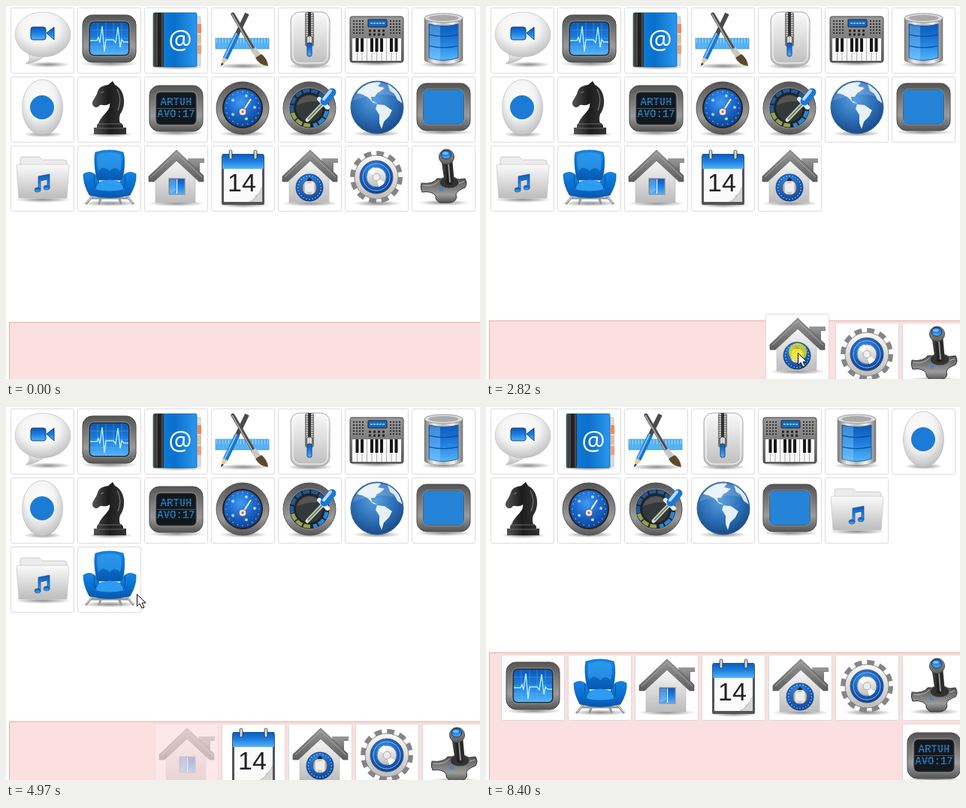
An HTML page for the animation above (9 s loop, 631x497 px).

```html
<!DOCTYPE html>
<html lang="en">
<head>
<meta charset="utf-8">
<title>Drag icons to the tray</title>
<style>
html, body { margin: 0; width: 100%; height: 100%; overflow: hidden; background: #fff; }
svg { display: block; width: 631px; height: 497px; }
</style>
</head>
<body>
<svg id="stage" viewBox="0 0 631 497"></svg>
<script>
const stops = list => list.map((c, i) => `<stop offset="${i / (list.length - 1)}" stop-color="${c}"/>`).join('');
const linear = (id, list, across = 0) =>
  `<linearGradient id="${id}" x1="0" y1="0" x2="${across}" y2="${1 - across}">${stops(list)}</linearGradient>`;
const radial = (id, list) => `<radialGradient id="${id}" cx=".45" cy=".35" r=".7">${stops(list)}</radialGradient>`;

const paint = id => `fill="url(#${id})"`;
const path = (d, attrs) => `<path d="${d}" ${attrs}/>`;
const line = (d, color, width = 1, more = '') =>
  path(d, `fill="none" stroke="${color}" stroke-width="${width}" ${more}`);
const rect = (x, y, w, h, r, attrs) =>
  `<rect x="${x}" y="${y}" width="${w}" height="${h}" rx="${r}" ${attrs}/>`;
const oval = (x, y, rx, ry, attrs) => `<ellipse cx="${x}" cy="${y}" rx="${rx}" ry="${ry}" ${attrs}/>`;
const disc = (x, y, r, attrs) => oval(x, y, r, r, attrs);
const shadow = (x, y, w) => oval(x, y, w, 4, paint('shade'));
const text = (x, y, size, font, attrs, s) =>
  `<text x="${x}" y="${y}" font-size="${size}" font-family="${font}" text-anchor="middle" ${attrs}>${s}</text>`;

const gradients =
  linear('steel', ['#555', '#777', '#9b9b9b', '#555']) +
  linear('silver', ['#fafafa', '#dcdcdc', '#bcbcbc']) +
  linear('chrome', ['#777', '#eee', '#bbb', '#f5f5f5', '#777'], 1) +
  linear('blue', ['#0b59b8', '#1d7fe0', '#55b5fa']) +
  linear('cover', ['#0a84e0', '#0b70cc', '#2a98ee'], 1) +
  linear('seat', ['#1187e6', '#0a6fd0', '#0758b0']) +
  linear('slate', ['#999', '#5e5e5e']) +
  linear('black', ['#555', '#1c1c1c', '#333'], 1) +
  radial('pearl', ['#fff', '#f4f4f4', '#b9b9b9']) +
  radial('sea', ['#5d9fdd', '#2f74bd', '#17457f']) +
  radial('glow', ['#3d9cf5', '#1a66c8', '#0c3a86']) +
  `<radialGradient id="shade"><stop offset="0" stop-color="#000" stop-opacity=".45"/>
   <stop offset="1" stop-color="#000" stop-opacity="0"/></radialGradient>`;

const bezel = (y, h) => shadow(43, y + h + 2, 38) +
  rect(7, y, 71, h, 13, paint('steel') + ' stroke="#4a4a4a"') +
  rect(15, y + 8, 55, h - 16, 7, 'fill="#2b2b2b" stroke="#aaa" stroke-width=".8"');
const house = shadow(43, 77, 38) +
  path('M58 17H80V23H74V42L60 30Z', paint('slate')) +
  path('M15 42L43 16 68 42V76H15Z', paint('silver') + ' stroke="#bbb" stroke-width=".6"') +
  path('M43 6L79 40V48H73L43 20 13 48H6V41Z', paint('slate') + ' stroke="#555" stroke-width=".7"') +
  line('M9 42L43 10 77 42', '#aaa');
const ball = shadow(43, 76, 32) + disc(42, 42, 35, paint('steel') + ' stroke="#555"');

// Evenly spaced points around a centre
const ring = (n, r, x, y, size, color) => Array.from({ length: n }, (_, i) => {
  const a = i / n * 2 * Math.PI;
  return disc(x + r * Math.cos(a), y + r * Math.sin(a), size, `fill="${color}"`);
}).join('');
const repeat = (n, f) => Array.from({ length: n }, (_, i) => f(i)).join('');

const icons = {
  chat: shadow(50, 76, 30) +
    path('M22 58Q30 69 20 75Q36 74 48 62Z', paint('silver') + ' stroke="#aaa" stroke-width=".6"') +
    oval(43, 36, 37, 30, paint('pearl') + ' stroke="#bbb" stroke-width=".6"') +
    rect(27, 26, 20, 17, 3, paint('blue') + ' stroke="#12427f"') +
    path('M48 34L58 26V43Z', paint('blue') + ' stroke="#12427f"'),

  monitor: bezel(10, 63) + rect(17, 20, 51, 43, 5, paint('blue')) +
    line('M17 30H68M17 41H68M17 52H68M27 20V63M38 20V63M48 20V63M59 20V63', '#67bdf7', .6, 'opacity=".6"') +
    line('M17 44H26L28 40 30 47 33 25 36 59 38 43H48L51 47 54 26 57 53 59 43 62 46H68', '#b4efff', 1.4),

  book: shadow(44, 79, 36) + rect(67, 12, 8, 65, 1, 'fill="#ddd" stroke="#aaa" stroke-width=".6"') +
    rect(71, 22, 5, 12, 1, 'fill="#e88b60"') + rect(71, 36, 5, 12, 1, 'fill="#d8c0a8"') +
    rect(71, 50, 5, 12, 1, 'fill="#e5a184"') +
    rect(12, 7, 58, 72, 2, paint('cover') + ' stroke="#08518f" stroke-width=".7"') +
    rect(12, 7, 14, 72, 2, paint('black')) + line('M17 8V78M24 8V78', '#777', .8) +
    text(48, 55, 35, "'Open Sans', sans-serif", 'fill="#fff"', '@'),

  tools: shadow(43, 78, 36) +
    rect(6, 41, 71, 14, 0, 'fill="#58b1f2" stroke="#2b83cc" stroke-width=".6"') +
    line('M7 44.5H77', '#9ed5fb', 6, 'stroke-dasharray="1 3"') +
    line('M48 8L33 39', '#4a4a4a', 6) + line('M35 35L19 68', '#1777d0', 7) +
    line('M34 34L18 67', '#7cc2f8', 2) + path('M15.500 66L22.500 70 13 78Z', 'fill="#e4c6a0"') +
    path('M14 74L17 75 13 78Z', 'fill="#222"') +
    line('M29 9L57 57', '#4d4d4d', 5, 'stroke-linecap="round"') + line('M28 9L55 56', '#bbb', 1.5) +
    line('M56 55L63 65', '#c8c8c8', 8) + path('M59 67L67 62Q75 68 76 78Q64 77 59 67Z', 'fill="#5a4a2c"'),

  zip: shadow(43, 78, 31) + rect(17, 6, 52, 71, 12, paint('silver') + ' stroke="#aaa"') +
    rect(20, 8, 46, 66, 10, 'fill="none" stroke="#fff"') +
    rect(36, 6, 12, 46, 3, 'fill="#777"') + line('M42 7V49', '#ddd', 9, 'stroke-dasharray="1.5 1.5"') +
    rect(40, 6, 4, 44, 0, 'fill="#333"') + rect(38, 38, 8, 11, 3, paint('chrome') + ' stroke="#444"') +
    rect(39, 47, 6, 18, 2, paint('blue') + ' stroke="#18477f"'),

  keys: shadow(43, 74, 38) + rect(7, 12, 71, 61, 3, paint('slate') + ' stroke="#444"') +
    rect(31, 16, 25, 10, 1, 'fill="#1769bd" stroke="#222"') + line('M34 21H53', '#6cc4ff', 2, 'stroke-dasharray="3 1"') +
    line('M11 18H27M11 22H27M11 26H27M11 30H27M11 34H27M60 18H75M60 22H75M60 26H75M60 30H75M60 34H75', '#333', 2, 'stroke-dasharray="2 2"') +
    line('M32 31H55M32 36H55', '#222', 3, 'stroke-dasharray="3 3"') +
    rect(10, 41, 65, 30, 1, 'fill="#f8f8f8"') +
    repeat(9, i => line(`M${16.5 + i * 6.5} 41V71`, '#999', .8)) +
    repeat(9, i => i % 4 == 2 ? '' : rect(14.500 + i * 6.5, 41, 4, 18, .5, 'fill="#181818"')),

  drum: shadow(43, 76, 32) + path('M17 14V70A26 7 0 0 0 68 70V14Z', paint('chrome') + ' stroke="#888" stroke-width=".6"') +
    oval(42.500, 14, 25.500, 6, 'fill="#ddd" stroke="#999"') + oval(42.500, 14, 20, 4, 'fill="#aaa"') +
    path('M23 22Q42 27 62 22V67Q42 74 23 67Z', paint('blue') + ' stroke="#2c5b8c"') +
    path('M24 23Q34 25 38 25V70Q28 70 24 67Z', 'fill="#8ed3ff" opacity=".4"') +
    line('M23 36Q42 41 62 36M23 51Q42 56 62 51', '#0c468b', 1.2),

  egg: shadow(43, 77, 26) + oval(42.500, 41, 27, 37, paint('pearl') + ' stroke="#bbb" stroke-width=".7"') +
    disc(42, 41, 16, 'fill="#1c7bd6"'),

  knight: shadow(44, 77, 30) +
    path('M47 6L50 11C63 17 66 38 57 50C55 56 56 60 58 64H28C30 52 45 46 43 36C38 40 33 37 30 38C27 42 22 42 20 37C19 32 25 28 27 20C29 13 36 12 41 11Z', paint('black')) +
    path('M28 62H58Q62 65 61 68H65V77H22V68H26Q25 65 28 62Z', paint('black')) +
    line('M28 63H58M25 69H62', '#777', .8) + line('M31 22L35 20M53 17Q60 30 54 45', '#777', 1.2),

  board: bezel(12, 61) + rect(17, 22, 51, 41, 5, 'fill="#14191e"') +
    text(42.500, 38, 14, "'Liberation Mono', monospace", 'font-weight="700" fill="#2f9df0"', 'ARTUH') +
    text(42.500, 54, 14, "'Liberation Mono', monospace", 'font-weight="700" fill="#2f9df0"', 'AVO:17') +
    line(repeat(10, i => `M17 ${24 + i * 4}H68`) + repeat(17, i => `M${18 + i * 3} 22V63`), '#14191e', .7) +
    line('M17 42.500H68', '#555'),

  gauge: ball + disc(42, 42, 26, paint('glow') + ' stroke="#222" stroke-width="2"') +
    ring(20, 22, 42, 42, .7, '#b4dcff') +
    ring(5, 16, 42, 41, 2, '#a9d4fb') + line('M42 47L53 30', '#fff', 2) +
    disc(42, 47, 5, 'fill="#e5e5e5" stroke="#555"') + disc(42, 47, 1.5, 'fill="#d44"'),

  dial: ball + disc(42, 42, 27, 'fill="#222" stroke="#aaa" stroke-width=".8"') +
    line('M24 57A23 23 0 0 1 60 27', '#1d5898', 5, 'stroke-dasharray="9 2"') +
    line('M64 35A23 23 0 0 1 47 65', '#2388dd', 5, 'stroke-dasharray="9 2"') +
    line('M43 65A23 23 0 0 1 19 46', '#93a24f', 5, 'stroke-dasharray="9 2"') +
    disc(42, 42, 18, 'fill="#34383a"') + path('M25 38A18 18 0 0 1 57 33Q41 32 25 38Z', 'fill="#555"') +
    line('M39 58L60 36', '#ddd', 5, 'stroke-linecap="round"') + line('M40 57L59 37', '#66884c', 2) +
    line('M55 30L66 41', '#e8eef5', 6, 'stroke-linecap="round"') +
    line('M62 33L72 21', '#1b78d2', 11, 'stroke-linecap="round"') +
    line('M61 30L70 19', '#b6ddff', 4, 'stroke-linecap="round"'),

  globe: shadow(43, 76, 32) + disc(43, 41, 35, paint('sea') + ' stroke="#315f94"') +
    path('M16 22C24 11 36 6 48 8L44 13 53 15 47 20 43 22 40 27 35 27 36 32 44 36 38 35 31 28 24 24Z', 'fill="#e7f0f8"') +
    path('M43 37L53 38 63 45 59 53 52 60 49 70 46 62 46 51 41 43Z', 'fill="#e7f0f8"') +
    path('M57 10Q68 16 73 25L77 36 70 31 66 23 60 19Z', 'fill="#d5e6f5"') +
    path('M10 33Q18 10 43 8Q64 8 74 28Q43 18 10 33Z', 'fill="#fff" opacity=".16"'),

  screen: bezel(9, 63) + rect(16, 18, 53, 45, 4, 'fill="#2583d8"'),

  folder: shadow(43, 72, 38) + path('M13 30V18Q13 15 16 15H38L42 19H71Q75 19 75 23V34Z', 'fill="#ececec" stroke="#ccc"') +
    path('M8 27Q8 25 10 25H76Q78 25 78 27L75 70H11Z', paint('silver') + ' stroke="#c4c4c4" stroke-width=".7"') +
    path('M37 41L52 38V57H49V45L40 47V60H37Z', paint('blue') + ' stroke="#145094" stroke-width=".7"') +
    oval(36, 59, 4, 3, paint('blue') + ' stroke="#145094" stroke-width=".7"') +
    oval(48, 56, 4, 3, paint('blue') + ' stroke="#145094" stroke-width=".7"'),

  chair: shadow(43, 77, 38) +
    line('M20 67L12 77M66 67L74 77M18 70H68M32 68L29 77M55 68L58 77', '#999', 3, 'stroke-linecap="round"') +
    line('M20 67L12 76M66 67L74 76', '#eee') +
    path('M24 9Q43 3 61 9Q65 20 60 46H26Q21 20 24 9Z', paint('seat') + ' stroke="#0759a8" stroke-width=".7"') +
    path('M27 12Q43 6 58 12Q60 25 57 34Q50 26 43 34Q34 25 28 34Q25 20 27 12Z', 'fill="#3faaf5" opacity=".55"') +
    path('M8 38Q16 33 23 38L30 50H56L63 38Q71 33 78 38Q79 51 70 66Q43 73 16 66Q8 52 8 38Z', paint('seat') + ' stroke="#07539e" stroke-width=".7"') +
    path('M30 48Q43 43 56 48L63 58Q43 63 23 58Z', 'fill="#2d9cf0"') +
    line('M23 39Q21 50 25 58M63 39Q65 50 61 58', '#074f97'),

  house: house + rect(33, 44, 21, 21, 0, paint('blue') + ' stroke="#888"') + line('M43.500 45V64', '#fff', 1.2) +
    path('M34 45H42V60L34 64Z', 'fill="#a0dcff" opacity=".4"'),

  calendar: shadow(43, 79, 33) + rect(14, 12, 57, 67, 2, 'fill="#555"') +
    rect(17, 14, 51, 61, 1, 'fill="#fafafa"') + rect(15, 11, 55, 20, 1, paint('blue')) +
    rect(24, 6, 4, 12, 2, paint('chrome') + ' stroke="#333" stroke-width=".7"') +
    rect(57, 6, 4, 12, 2, paint('chrome') + ' stroke="#333" stroke-width=".7"') +
    text(41, 61, 34, "'Liberation Sans', sans-serif", 'fill="#222"', '14') +
    path('M68 55V75H50Q58 73 59 66Q66 64 68 55Z', 'fill="#d5d5d5"') + line('M51 75Q62 70 68 55', '#aaa', .7),

  safe: house + disc(42, 56, 18, paint('glow') + ' stroke="#174b87"') +
    ring(24, 15.5, 42, 56, .7, '#d4ebff') + disc(42, 56, 10, paint('chrome') + ' stroke="#555"') +
    path('M38 47L42 42 46 47Z', 'fill="#222"') + disc(42, 56, 6, 'fill="#eee"'),

  gear: shadow(43, 77, 32) +
    `<circle cx="42" cy="42" r="31" fill="none" stroke="#858585" stroke-width="8" stroke-dasharray="9.500 6.730"/>` +
    disc(42, 42, 29, paint('silver') + ' stroke="#888"') + disc(42, 42, 22, paint('glow') + ' stroke="#555"') +
    disc(42, 42, 18, 'fill="none" stroke="#7dc0fa"') + disc(42, 42, 13, paint('silver') + ' stroke="#7a8ba0"') +
    path('M42 42L31 35A13 13 0 0 1 39 29ZM42 42L53 49A13 13 0 0 1 45 55Z', 'fill="#fff"') +
    disc(42, 42, 5, 'fill="#eee" stroke="#aaa"'),

  stick: shadow(43, 76, 34) +
    path('M13 50Q28 52 34 44H58Q63 46 71 44Q75 51 71 56Q60 60 59 65Q62 74 51 76H38Q31 73 32 67Q27 60 14 62Q11 56 13 50Z', paint('steel') + ' stroke="#333"') +
    line('M15 53Q30 55 36 47M70 48L58 52', '#bbb') + oval(50, 49, 13, 8, 'fill="#333" stroke="#777"') +
    path('M39 17H54L57 50Q50 55 44 50Z', paint('black')) + line('M49 24L51 49', '#999', 2) +
    oval(46.500, 15, 10, 10, paint('slate') + ' stroke="#444"') +
    oval(46, 12, 7, 6, paint('blue') + ' stroke="#234"') + oval(45, 10, 4, 2, 'fill="#9bd8ff" opacity=".7"') +
    line('M38 56V61M41 56V61', '#1f87e8', 1.5)
};

const names = Object.keys(icons);
const card = rect(.5, .5, 84, 87, 2, 'fill="#fff" stroke="#dcdcdc"');
const useTag = (id, name) => `<use id="${id}" href="#${name}"/>`;
const stage = document.getElementById('stage');
stage.innerHTML = `<defs>${gradients}${names.map(n => `<g id="${n}">${card}${icons[n]}</g>`).join('')}</defs>` +
  rect(4.5, 0, 700, 300, 0, 'id="tray" fill="#fcdfdf" stroke="#efaaa0"') +
  names.map(n => useTag('item-' + n, n)).join('') + useTag('helper', 'stick') +
  `<g id="cursor">${disc(0, -1, 12, 'id="spot" fill="#f2e418" opacity=".75"')}` +
  path('M.5 .5V16.500L4 13 7 19 10 18 7 12H12Z', 'fill="#fff" stroke="#000"') + '</g>';

const $ = id => document.getElementById(id);
const place = (el, [x, y]) => el.setAttribute('transform', `translate(${x} ${y})`);

// name, press time, drop time
const drags = [
  ['stick', 250, 760], ['gear', 1250, 2058], ['safe', 2480, 2870], ['calendar', 3130, 3680],
  ['house', 4225, 4704], ['chair', 5230, 5640], ['monitor', 6150, 6678], ['board', 7330, 7930]
].map(([name, press, drop]) => ({ name, press, drop }));

// time, x, y
const track = [
  [74, 575, 252], [230, 580, 236], [290, 580, 236], [660, 592, 464], [770, 592, 464],
  [1150, 495, 236], [1300, 495, 236], [1980, 508, 460], [2058, 508, 460], [2303, 413, 250],
  [2450, 405, 238], [2510, 405, 238], [2830, 415, 462], [2870, 415, 462], [3130, 305, 237],
  [3492, 293, 462], [3640, 291, 465], [3680, 291, 465], [4080, 213, 232], [4230, 213, 232],
  [4640, 216, 455], [4704, 216, 455], [4978, 174, 249], [5126, 160, 240], [5220, 148, 236],
  [5600, 150, 458], [5640, 150, 458], [6090, 107, 58], [6168, 107, 58], [6241, 107, 97],
  [6612, 49, 455], [6770, 49, 455], [7058, 117, 200], [7280, 140, 140], [7350, 140, 140],
  [7850, 358, 453], [9000, 358, 453]
];
const LOOP = 9000, STEP = 74.3, FADE = 200;
const swing = p => .5 - Math.cos(Math.PI * Math.min(1, Math.max(0, p))) / 2;
const slot = i => [6 + 89 * (i % 7), 2 + 92 * Math.floor(i / 7)];

function pointer(t) {
  const i = Math.max(1, track.findIndex(k => k[0] > t));
  const [a, b] = [track[i - 1], track[i]];
  const p = swing((t - a[0]) / (b[0] - a[0]));
  return [a[1] + (b[1] - a[1]) * p, a[2] + (b[2] - a[2]) * p].map(Math.round);
}

function draw(now) {
  const t = Math.floor((now % LOOP + 12) / STEP) * STEP;
  const moved = drags.filter(d => t >= d.drop + FADE);
  const left = names.filter(n => !moved.some(d => d.name == n));
  const top = moved.length == 0 ? 421 : moved.length < 8 ? 419 : 327;

  $('tray').setAttribute('y', top + .5);
  left.forEach((n, i) => {
    const d = drags.find(d => d.name == n);
    place($('item-' + n), slot(i));
    $('item-' + n).setAttribute('opacity', d ? 1 - swing((t - d.drop) / FADE) : 1);
  });
  moved.forEach((d, i) => {
    const el = $('item-' + d.name);
    place(el, [554 - 89 * (i % 7), top + 3 + 92 * Math.floor(i / 7)]);
    el.setAttribute('opacity', swing((t - d.drop - FADE) / FADE));
  });

  const tip = pointer(t);
  const held = drags.find(d => t >= d.press && t < d.drop);
  if (held) {
    const grab = pointer(held.press);
    const home = slot(left.indexOf(held.name));
    $('helper').setAttribute('href', '#' + held.name);
    place($('helper'), home.map((v, i) => v + tip[i] - grab[i]));
  }
  $('helper').style.display = $('spot').style.display = held ? '' : 'none';
  $('cursor').style.display = t > 0 && t < 8390 ? '' : 'none';
  place($('cursor'), tip);
}

const start = performance.now();
(function tick() {
  draw(performance.now() - start);
  requestAnimationFrame(tick);
})();
</script>
</body>
</html>
```
